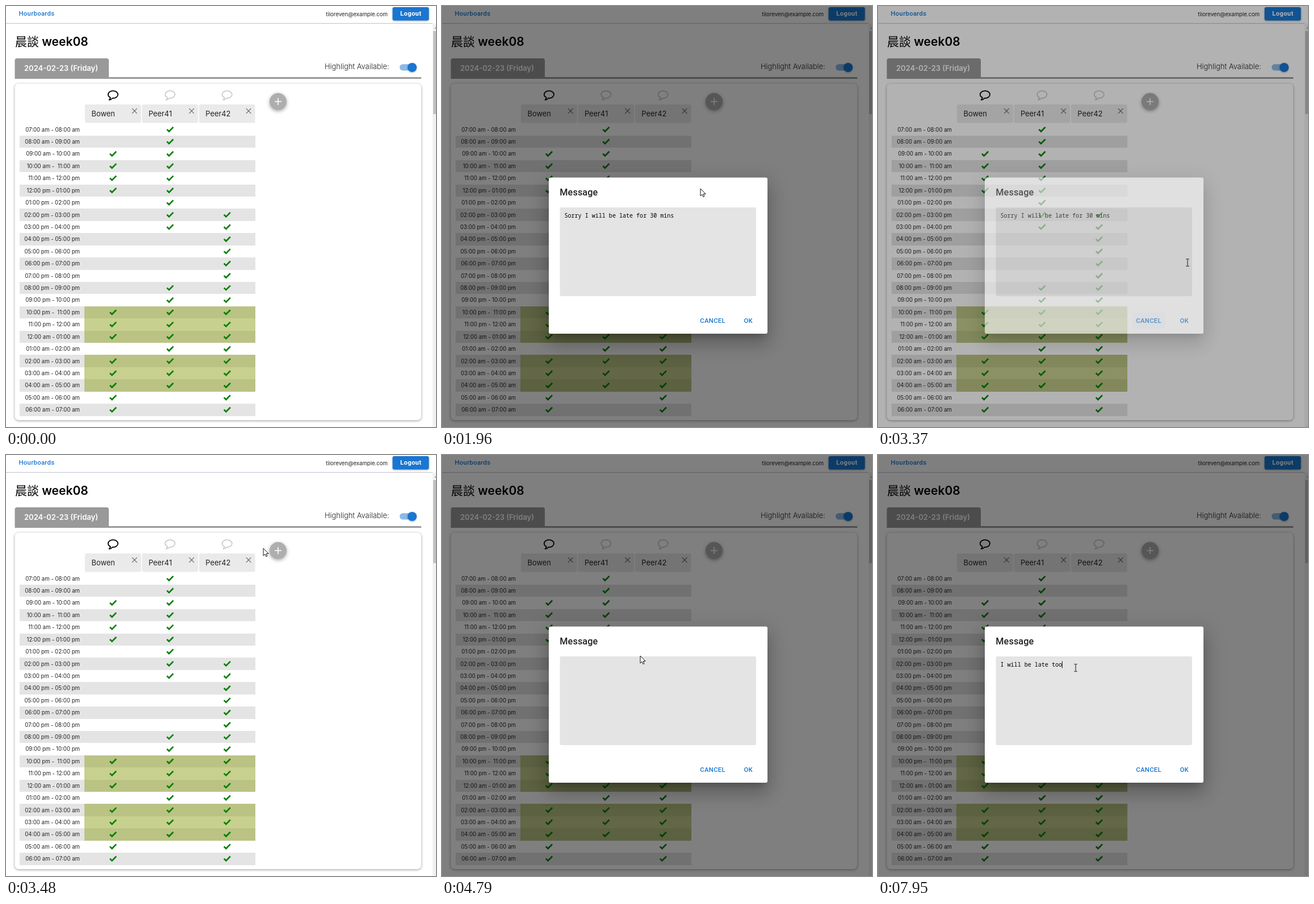
These frames come from a looping animation (757 by 740 pixels, 8 s). An HTML page:

```html
<!DOCTYPE html>
<html lang="en">
<head>
<meta charset="utf-8">
<title>Schedule</title>
<style>
html, body { margin: 0; width: 100%; height: 100%; overflow: hidden; background: #fff; }
svg { display: block; }
text { font-family: Inter, sans-serif; white-space: pre; }
.ui { font-family: Roboto, sans-serif; font-weight: 500; font-size: 11.3px; letter-spacing: .32px; }
.mono { font-family: "Noto Sans Mono", monospace; font-size: 10.05px; }
.time { font-size: 9.65px; text-anchor: end; }
.card { filter: drop-shadow(0 1px 2px rgba(0,0,0,.4)); }
.raised { filter: drop-shadow(0 1.5px 1.5px rgba(0,0,0,.3)); }
.float { filter: drop-shadow(0 2.5px 3px rgba(0,0,0,.35)); }
</style>
</head>
<body>
<svg id="stage" width="757" height="740" viewBox="0 0 757 740"></svg>
<script>
const LOOP = 8000, STEP = 56;
const BLUE = '#1976d2';
const ROW = 21.42, TOP = 206.5, COL = 100.4;
const people = ['Bowen', 'Peer41', 'Peer42'];
const free = [[[2, 5], [15, 17], [19, 23]], [[0, 8], [13, 21]], [[7, 23]]];
const isFree = (col, row) => free[col].some(([a, b]) => row >= a && row <= b);

const rect = (x, y, w, h, fill, extra = '') =>
  `<rect x="${x}" y="${y}" width="${w}" height="${h}" fill="${fill}" ${extra}/>`;
const text = (x, y, str, extra = '') => `<text x="${x}" y="${y}" ${extra}>${str}</text>`;

function hour(n) {
  const h = n % 24;
  return String(h % 12 || 12).padStart(2, '0') + ':00 ' + (h < 12 ? 'am' : 'pm');
}

function header() {
  return rect(0, 30, 751, 1.2, '#c6c8d4') +
    text(22.5, 17.3, 'Hourboards', `class="ui" fill="${BLUE}"`) +
    text(672, 18, 'tiloreven@example.com', 'font-size="9.6" text-anchor="end" fill="#222"') +
    rect(680.5, 2, 64, 23.5, BLUE, 'rx="3.2" class="raised"') +
    text(712.7, 17.3, 'Logout', 'class="ui" style="font-weight:600" text-anchor="middle" fill="#fff"') +
    rect(751, 31, 6, 709, '#f1f1f1') + rect(752, 44, 5, 146, '#c1c1c1') +
    '<path d="M754 40l3-3.5v3.5z" fill="#a3a3a3"/>';
}

function heading() {
  return text(16, 69.5, '<tspan font-weight="500">晨談</tspan> week08',
      'font-size="21" font-weight="600" fill="#000" style="font-family:Inter,\'Noto Sans CJK TC\',\'Noto Sans CJK JP\',sans-serif"') +
    '<path d="M15.5 128V96a4 4 0 0 1 4-4H177a4 4 0 0 1 4 4V125H731V128z" fill="#999"/>' +
    text(32, 113.5, '2024-02-23 (Friday)', 'font-size="13" font-weight="600" fill="#fff"') +
    text(561, 111, 'Highlight Available:', 'font-size="12.9" font-weight="300" fill="#222"') +
    rect(693, 102.2, 28, 11.4, '#8cbae8', 'rx="5.7"') +
    `<circle cx="715" cy="108" r="8.1" fill="${BLUE}" class="raised"/>`;
}

function person(name, i) {
  const x = 139 + i * COL, ink = i ? '#ccc' : '#000';
  return rect(x, 173, 98.8, 32.6, '#eaeaea', 'rx="3"') +
    text(x + 11.5, 194, name, 'font-size="12.86" fill="#222"') +
    `<path d="M${x + 83} 180.2l8.6 8.6m0-8.6l-8.6 8.6" stroke="#666" stroke-width="1.2"/>` +
    `<path transform="translate(${x + 49.4} 156)" d="M-4.6 4.9C-7.2 3.8-8.6 1.9-8.6-.4C-8.6-4.1-4.8-6.9 0-6.9S8.6-4.1 8.6-.4S4.8 6.1 0 6.1L-.9 6C-2.6 8.1-4.4 9-6.8 9.1C-5.4 7.8-4.7 6.6-4.6 4.9z" fill="none" stroke="${ink}" stroke-width="1.8" stroke-linejoin="round"/>`;
}

function row(i) {
  const y = TOP + i * ROW, odd = i % 2;
  const top = Math.round(y), height = Math.round(y + ROW) - top;
  const label = hour(i + 7) + ' - ' + (hour(i + 8).startsWith('11') ? '\u00a0' : '') + hour(i + 8);
  let out = odd ? rect(24, top, 415, height, '#e4e4e4') : '';
  if (people.every((_, c) => isFree(c, i))) out += rect(138, top, 301, height, odd ? '#bac384' : '#c7d08f');
  out += text(130, y + 14.1, label, 'class="time" fill="#222"');
  people.forEach((_, c) => {
    if (isFree(c, i)) out += `<path d="M${182.9 + c * COL} ${y + 10.4}l3.7 3.6l7.5-7.6" fill="none" stroke="#008000" stroke-width="2.7"/>`;
  });
  return out;
}

function card() {
  return rect(15.5, 136.5, 715.5, 591.5, '#fff', 'rx="7" class="card"') +
    people.map(person).join('') +
    Array.from({ length: 24 }, (_, i) => row(i)).join('') +
    '<circle cx="479" cy="168" r="15" fill="#aeaeae" class="float"/>' +
    '<path d="M473 168h12m-6-6v12" stroke="#fff" stroke-width="1.6"/>';
}

const shadow = (dy, blur, spread, alpha) =>
  rect(188 - spread, 301.5 + dy - spread, 385 + 2 * spread, 274.5 + 2 * spread, '#000',
    `rx="3.3" opacity="${alpha}" style="filter:blur(${blur / 2}px)"`);

function dialog() {
  return shadow(9, 12, -5.6, .2) + shadow(19, 30, 2.4, .14) + shadow(7, 37, 6.4, .12) +
    rect(188, 301.5, 385, 274.5, '#fff', 'rx="3.3"') +
    text(207.3, 333.3, 'Message', 'class="ui" style="font-size:16.2px;letter-spacing:.12px" fill="#212121"') +
    rect(207.5, 354, 345.5, 156, '#e4e4e4', 'rx="3"') +
    rect(448, 539.5, 58.5, 28, BLUE, 'rx="3.2" id="hoverCancel"') +
    rect(514, 539.5, 51.5, 28, BLUE, 'rx="3.2" id="hoverOk"') +
    text(454.3, 557.2, 'CANCEL', `class="ui" fill="${BLUE}"`) +
    text(531.5, 557.2, 'OK', `class="ui" fill="${BLUE}"`) +
    text(215.5, 372.3, '', 'class="mono" id="note" fill="#000"') +
    rect(0, 362.5, 1, 12, '#000', 'id="caret"');
}

function loader() {
  return rect(0, 0, 757, 740, '#fff', 'opacity=".8"') +
    [364.4, 380, 395.6].map(x => `<circle class="dot" cx="${x}" cy="396" fill="#36d7b7"/>`).join('');
}

document.getElementById('stage').innerHTML =
  rect(0, 0, 757, 740, '#fff') + header() + heading() + card() +
  `<g id="loader">${loader()}</g>` +
  rect(0, 0, 757, 740, '#000', 'id="shade"') +
  `<g id="dialog">${dialog()}</g>` +
  '<path id="arrow" d="M0 0V13L3 10.2L5 14.6L7 13.7L5.1 9.4H9.2z" fill="#fff" stroke-width="1" stroke-linejoin="round"/>' +
  '<path id="beam" d="M-2.7-6.3H-.8L0-5.7L.8-6.3H2.7M0-5.7V5.7M-2.7 6.3H-.8L0 5.7L.8 6.3H2.7" fill="none" stroke="#111" stroke-width="1"/>';

const el = Object.fromEntries([...document.querySelectorAll('[id]')].map(e => [e.id, e]));
const dots = document.querySelectorAll('.dot');

// time, x, y of the pointer
const path = [
  [0, 660, 405], [230, 660, 405], [340, 334, 332], [500, 334, 332], [800, 206, 188], [1010, 184, 163],
  [1070, 184, 163], [1350, 184, 163], [1650, 350, 255], [1960, 455, 321], [2120, 455, 321], [2340, 520, 430],
  [2560, 562, 530], [2700, 545, 554], [2870, 493, 554], [2930, 491, 553], [3090, 485, 550],
  [3270, 485, 550], [3320, 528, 512], [3370, 545, 451], [3480, 453, 164], [3700, 330, 158],
  [3940, 287, 161], [4110, 287, 161], [4390, 287, 161], [4790, 349, 353], [4900, 348, 358],
  [4960, 348, 358], [5130, 348, 374], [LOOP, 348, 374]
];
const loads = [[1070, 1350], [4110, 4390]];
// first key, last key, number of keys
const bursts = [[5690, 5690, 1], [5860, 5860, 1], [6030, 6090, 2], [6260, 6370, 2], [6820, 7550, 9], [7780, 7950, 3]];
const reply = 'I will be late too';

const clamp = v => Math.max(0, Math.min(1, v));
const ease = (t, start, span) => { const u = clamp((t - start) / span); return u * u * (3 - 2 * u); };
const show = (e, on) => e.setAttribute('visibility', on ? 'visible' : 'hidden');

// The screen refreshes in even steps between pointer keys.
function refresh(t) {
  const i = path.findIndex(p => p[0] > t), [a, b] = [path[i - 1], path[i]];
  const span = b[0] - a[0], n = Math.max(1, Math.round(span / STEP));
  const u = Math.floor((t - a[0]) / span * n) / n;
  return [0, 1, 2].map(k => a[k] + (b[k] - a[k]) * u);
}

function typed(t) {
  return bursts.reduce((n, [from, to, keys]) => {
    if (t < from) return n;
    const gap = (to - from) / (keys - 1) || 1;
    return n + Math.min(keys, 1 + Math.floor((t - from) / gap + 1e-6));
  }, 0);
}

function draw(now) {
  const [t, x, y] = refresh(now);
  const open = t < 3900 ? ease(t, 1330, 225) - ease(t, 3288, 190) : ease(t, 4370, 225);
  el.shade.setAttribute('opacity', .5 * open);
  el.dialog.setAttribute('opacity', open);
  show(el.dialog, open > 0);

  const load = loads.find(([a, b]) => t >= a && t < b);
  show(el.loader, load);
  if (load) dots.forEach((d, i) => {
    const age = Math.max(0, t - load[0] - (i % 2 ? 0 : 350));
    const dip = (1 - Math.cos(age / 700 * 2 * Math.PI)) / 2;
    d.setAttribute('r', 6.4 * (1 - .25 * dip));
    d.setAttribute('opacity', 1 - .8 * dip);
  });

  const count = typed(now);
  el.note.textContent = t < 3900 ? 'Sorry I will be late for 30 mins' : reply.slice(0, count);
  el.caret.setAttribute('x', 215.2 + count * 6.03);
  el.caret.setAttribute('opacity', t >= 5130 ? 1 : 0);

  const onButton = y > 539 && y < 568 && open > .9;
  const leaving = t >= 3270 && t < 3900;
  el.hoverCancel.setAttribute('opacity', (onButton && x < 507) || leaving ? .04 : 0);
  el.hoverOk.setAttribute('opacity', onButton && x > 514 && x < 566 ? .04 : 0);

  const beam = open > .3 && x > 207 && x < 553 && y > 354 && y < 510;
  show(el.arrow, t >= 230 && !beam);
  show(el.beam, beam);
  el.arrow.setAttribute('stroke', load ? '#18b59c' : '#111');
  el.arrow.setAttribute('transform', `translate(${x} ${y})`);
  el.beam.setAttribute('transform', `translate(${x} ${y})`);
}

const start = performance.now();
function tick() {
  draw((performance.now() - start) % LOOP);
  requestAnimationFrame(tick);
}
tick();
</script>
</body>
</html>
```
